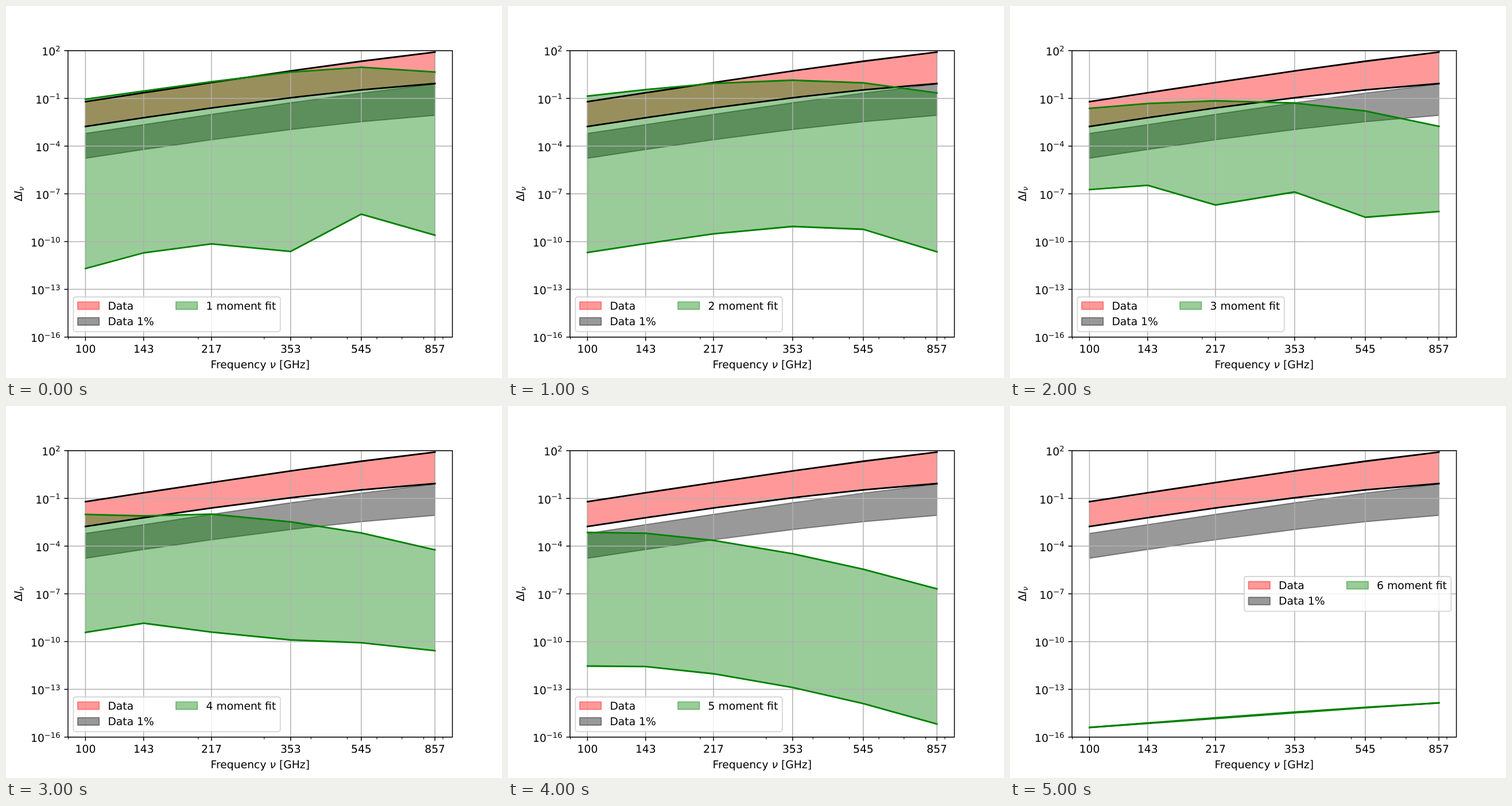
Write an HTML page that moves like this. It is 864x648 px and loops after 6000 ms.

```html
<!DOCTYPE html>
<html lang="en">
<head>
<meta charset="utf-8">
<title>Moment fits by frequency</title>
<style>
  html, body { margin: 0; width: 100%; height: 100%; overflow: hidden; background: #fff; }
  svg { display: block; width: 864px; height: 648px; }
  text { font: 18.75px "DejaVu Sans", sans-serif; white-space: pre; text-rendering: geometricPrecision; }
  .small { font-size: 13.125px; }
  .italic { font-style: italic; }
  .curve { fill: none; stroke-width: 2.8125; stroke-linecap: square; stroke-linejoin: round; }
  .band { fill-opacity: .4; stroke-opacity: .4; stroke-width: 1.875; stroke-linejoin: round; }
</style>
</head>
<body>
<svg id="chart" viewBox="0 0 864 648"></svg>
<script>
const STEP = 1000;
const LEFT = 108, RIGHT = 777.6, TOP = 77.76, BOTTOM = 576.72;
const DECADE = (BOTTOM - TOP) / 18;
const GRID = '#b0b0b0';
const frequencies = [100, 143, 217, 353, 545, 857];
const exponents = [2, -1, -4, -7, -10, -13, -16];

// Log position of a frequency: 0 at 100 GHz, 1 at 857 GHz.
const logPosition = f => Math.log(f / 100) / Math.log(8.57);
const xOf = f => 138.44 + 608.72 * logPosition(f);
const yOf = exponent => TOP + (2 - exponent) * DECADE;

// Edges are heights at each frequency; a trend is measured down from the top of the data.
const dataTop = u => 166.6 - 92.2 * u - 4 * u ** 2 + 10 * u ** 3;
const trend = (start, slope, bend, power) => frequencies.map(logPosition)
  .map(u => dataTop(u) + start + slope * u + bend * u ** power);

const data = [trend(0, 0, 0, 1), trend(43.2, 0, 11.5, 2.25)];
const onePercent = data.map(ys => ys.map(y => y + 2 * DECADE));
const fits = [
  [trend(-4.3, 8, 30.9, 5.5), [457.3, 430, 414.4, 427.6, 362.6, 399.3]],
  [trend(-9.6, 22, 58.6, 2.85), trend(262.7, 0, 85.1, 4.4)],
  [trend(11.7, 35, 82.6, 2.35), [319.8, 312.3, 346.7, 324, 368, 358]],
  [[188.8, 191.5, 188.3, 201.8, 221.2, 250.5], [394.5, 378.4, 393.8, 407.5, 412.3, 426.3]],
  [trend(53.6, 0, 184.5, 1.335), trend(286.4, 0, 187.3, 1.36)],
  [trend(393.4, 46, -2.7, 4), trend(393.4, 50, -6.5, 2.7)]
];

const points = ys => ys.map((y, i) => [xOf(frequencies[i]), y]);
const curve = (ys, color) =>
  `<polyline class="curve" stroke="${color}" points="${points(ys).join(' ')}"/>`;
const band = ([upper, lower], color) =>
  `<polygon class="band" fill="${color}" stroke="${color}" points="${
    [...points(upper), ...points(lower).reverse()].join(' ')}"/>`;
const line = (x1, y1, x2, y2, color = '#000', width = 1.5) =>
  `<line x1="${x1}" y1="${y1}" x2="${x2}" y2="${y2}" stroke="${color}" stroke-width="${width}"/>`;
const label = (x, y, content, anchor = 'start', extra = '') =>
  `<text x="${x}" y="${y}" text-anchor="${anchor}" ${extra}>${content}</text>`;

const grid = () =>
  frequencies.map(f => line(xOf(f), TOP, xOf(f), BOTTOM, GRID)).join('') +
  exponents.map(e => line(LEFT, yOf(e), RIGHT, yOf(e), GRID)).join('');

function axes() {
  let out = `<rect x="${LEFT}" y="${TOP}" width="${RIGHT - LEFT}" height="${BOTTOM - TOP}"
    fill="none" stroke="#000" stroke-width="1.5"/>`;
  for (const f of frequencies) {
    out += line(xOf(f), BOTTOM, xOf(f), BOTTOM + 6.56) + label(xOf(f), 604.2, f, 'middle');
  }
  for (const f of [90, 200, 300, 400, 500, 600, 700, 800, 900]) {
    out += line(xOf(f), BOTTOM, xOf(f), BOTTOM + 3.75, '#000', 1.125);
  }
  for (const e of exponents) {
    const power = String(e).replace('-', '\u2212');
    out += line(LEFT - 6.56, yOf(e), LEFT, yOf(e)) +
      label(94.5, yOf(e) + 8.6, `10<tspan class="small" dy="-7.4">${power}</tspan>`, 'end');
  }
  return out +
    label(442.8, 631, 'Frequency <tspan class="italic">ν</tspan> [GHz]', 'middle') +
    label(0, 0, 'Δ<tspan class="italic">I</tspan><tspan class="small italic" dy="3">ν</tspan>',
      'middle', 'transform="translate(27.8 327.5) rotate(-90)"');
}

function legend(order) {
  const entry = (x, baseline, color, name) =>
    `<rect class="band" x="${x}" y="${baseline - 13.1}" width="37.5" height="13.1"
      fill="${color}" stroke="${color}"/>` + label(x + 52.5, baseline, name);
  const shift = order === fits.length ? '290.6 -209.7' : '0 0';
  return `<g transform="translate(${shift})">
    <rect x="117.4" y="506.7" width="360.4" height="60.6" rx="3.75"
      fill="#fff" fill-opacity=".8" stroke="#ccc" stroke-opacity=".8" stroke-width="1.875"/>` +
    entry(124.9, 528.5, 'red', 'Data') +
    entry(124.9, 556, 'black', 'Data 1%') +
    entry(296, 528.5, 'green', `${order} moment fit`) + '</g>';
}

const chart = document.getElementById('chart');
let shown = -1;

function draw(index) {
  const fit = fits[index];
  chart.innerHTML =
    band(data, 'red') + band(onePercent, 'black') + band(fit, 'green') + grid() +
    data.map(ys => curve(ys, 'black')).join('') +
    fit.map(ys => curve(ys, 'green')).join('') +
    axes() + legend(index + 1);
}

function tick() {
  const index = Math.floor(performance.now() / STEP) % fits.length;
  if (index !== shown) draw(shown = index);
  requestAnimationFrame(tick);
}
tick();
</script>
</body>
</html>
```
